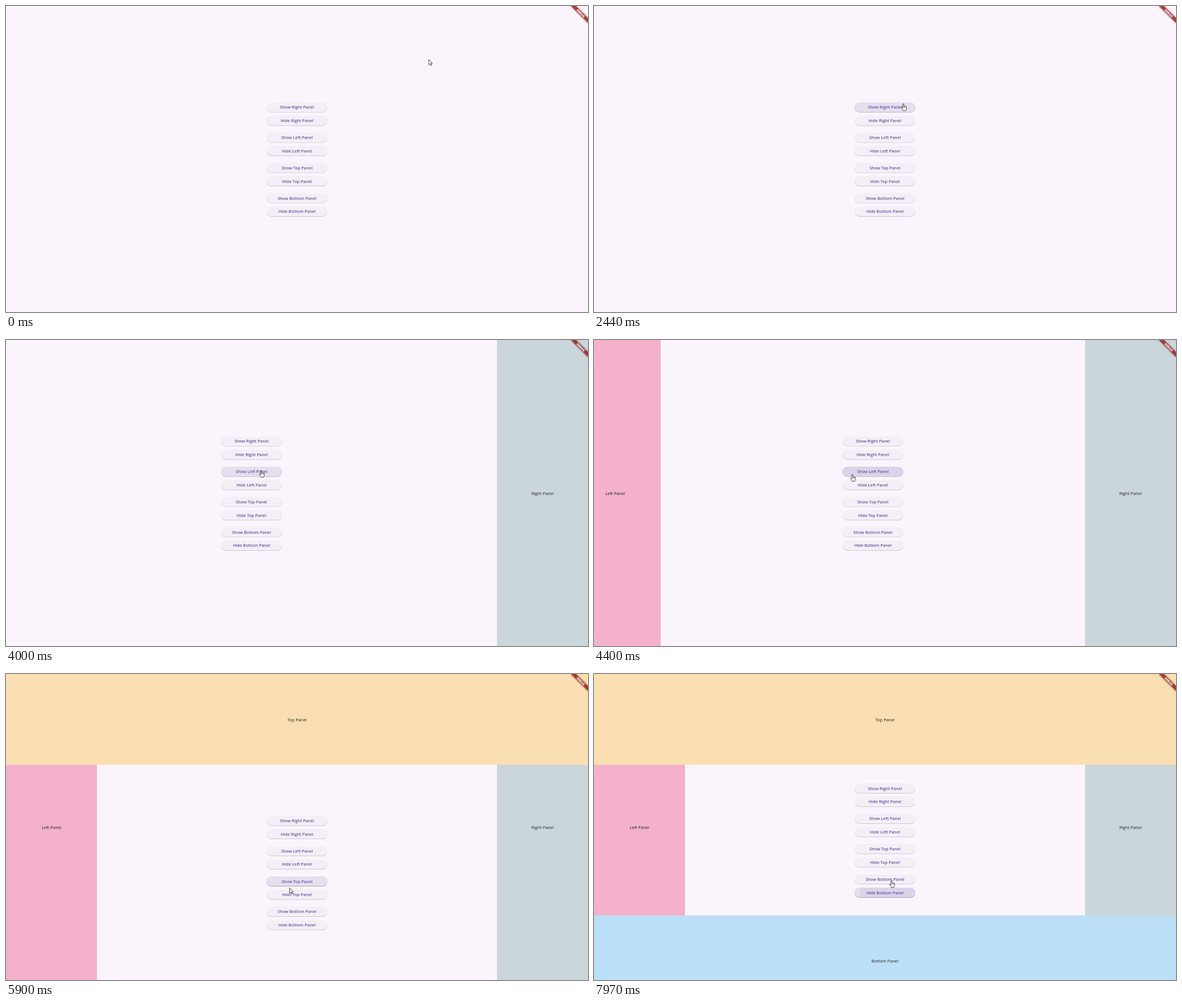
An HTML page for the animation above (8 s loop, 1031 by 543 pixels).

```html
<!DOCTYPE html>
<html lang="en">
<head>
<meta charset="utf-8">
<title>Sliding panels</title>
<style>
  html, body { margin: 0; width: 100%; height: 100%; overflow: hidden; background: #fbf4fc; }
  svg { display: block; width: 100vw; height: 100vh; }
  text { font-family: "Open Sans", "Noto Sans", sans-serif; font-size: 7.3px; text-anchor: middle; }
  .button text { font-weight: 600; fill: #6750a4; }
  .panel text { letter-spacing: .1px; fill: #1d1b20; }
  .banner { font-size: 5.4px; font-weight: 800; fill: #fff; }
  .cursor path { fill: #fff; stroke: #222; stroke-width: .8; stroke-linejoin: round; }
</style>
</head>
<body>
<svg viewBox="0 0 1031 543">
  <defs>
    <filter id="soft" x="-10%" y="-50%" width="120%" height="200%"><feGaussianBlur stdDeviation=".6"/></filter>
    <filter id="glow" x="-20%" y="-100%" width="140%" height="300%"><feGaussianBlur stdDeviation="1.5"/></filter>
    <clipPath id="pill"><rect x="-53.7" y="-8.6" width="107.4" height="17.2" rx="8.6"/></clipPath>
  </defs>
  <rect width="1031" height="543" fill="#fbf4fc"/>
  <g id="column"></g>
  <g id="panels"></g>
  <g transform="translate(1031 0) rotate(45)">
    <rect x="-21.5" y="15" width="43" height="6.45" opacity=".5" filter="url(#glow)"/>
    <rect x="-21.5" y="15" width="43" height="6.45" fill="#b71c1c" opacity=".63"/>
    <text class="banner" y="20.2">DEBUG</text>
  </g>
  <g id="arrow" class="cursor"><path d="M0 0V9.3L2.1 7.4L3.6 10.8L5 10.2L3.5 6.9H6.4Z"/></g>
  <g id="hand" class="cursor">
    <path d="M-.9 .8Q0-.5 .9 .8V4.6Q1.9 3.9 2.6 4.9Q3.6 4.3 4.2 5.3Q5.4 5 5.5 6.3V8.8Q5.4 10.4 4.4 11.4V12.7H-.5V11.6L-3.2 8Q-3.5 6.6-2.2 6.8L-.9 8Z"/>
    <path d="M1 5.5V7.3M2.7 5.6V7.3M4.2 6V7.4"/>
  </g>
</svg>
<script>
const W = 1031, H = 543, SIZE = 161.1, LOOP = 8000, SLIDE = 500;
const HALF_W = 53.7, HALF_H = 8.6, ROW = 23.65, PAIR = 53.75;
const $ = id => document.getElementById(id);

function add(parent, tag, attrs, text) {
  const node = document.createElementNS("http://www.w3.org/2000/svg", tag);
  for (const key in attrs) node.setAttribute(key, attrs[key]);
  if (text) node.textContent = text;
  return parent.appendChild(node);
}

const clamp = v => Math.min(1, Math.max(0, v));
const lerp = (a, b, k) => a + (b - a) * clamp(k);
const move = (node, x, y) => node.setAttribute("transform", `translate(${x} ${y})`);

// cubic-bezier(.42, 0, .58, 1)
function easeInOut(x) {
  x = clamp(x);
  let lo = 0, hi = 1;
  for (let i = 0; i < 20; i++) {
    const s = (lo + hi) / 2, u = 1 - s;
    if (3 * u * u * s * .42 + 3 * u * s * s * .58 + s ** 3 < x) lo = s; else hi = s;
  }
  return lo * lo * (3 - 2 * lo);
}

function makePanel(name, color, w, h) {
  const g = add($("panels"), "g", { class: "panel" });
  add(g, "rect", { width: w, height: h, fill: color });
  add(g, "text", { x: w / 2, y: h / 2 + 3.2 }, name + " Panel");
  return g;
}

const panels = {
  left: makePanel("Left", "#f3b1cc", SIZE, H),
  right: makePanel("Right", "#cbd6da", SIZE, H),
  top: makePanel("Top", "#fadfb2", W, SIZE),
  bottom: makePanel("Bottom", "#bbdff7", W, SIZE)
};

const pill = { x: -HALF_W, y: -HALF_H, width: 2 * HALF_W, height: 2 * HALF_H, rx: HALF_H };
const buttons = ["Right", "Left", "Top", "Bottom"].flatMap((side, pair) =>
  ["Show", "Hide"].map((verb, i) => {
    const y = (pair - 1.5) * PAIR + (i - .5) * ROW + .5;
    const g = add($("column"), "g", { class: "button" });
    move(g, 0, y);
    const shadow = add(g, "rect", { ...pill, y: .7 - HALF_H, fill: "#2b2440", filter: "url(#soft)" });
    add(g, "rect", { ...pill, fill: "#f4eff6" });
    const tint = add(g, "rect", { ...pill, fill: "#6750a4" });
    const clip = add(g, "g", { "clip-path": "url(#pill)" });
    const ripple = add(clip, "circle", { fill: "#6750a4" });
    add(g, "text", { y: 2.9 }, `${verb} ${side} Panel`);
    return { y, shadow, tint, ripple };
  }));

// Each click: the pointer arrives at (x, y), presses, and the panel starts to slide.
const clicks = [
  { button: 0, side: "right", arrive: 2100, press: 2900, x: 548, y: 173 },
  { button: 2, side: "left", arrive: 3600, press: 3990, x: 452, y: 231 },
  { button: 4, side: "top", arrive: 4750, press: 4865, x: 497, y: 286 },
  { button: 6, side: "bottom", arrive: 6200, press: 6285, x: 505, y: 421 },
  { button: 7, side: "bottom", arrive: 7500, press: 7695, x: 527, y: 366 }
];
const home = { x: 749, y: 95, press: 240 };
const RELEASE = 90, STAY = 360, LINGER = 1050;

// Visible width or height of a panel; a "Hide" button has an odd index.
const extent = (side, t) => clicks.filter(c => c.side === side).reduce((sum, c) =>
  sum + (c.button % 2 ? -SIZE : SIZE) * easeInOut((t - c.press - RELEASE) / SLIDE), 0);

const columnX = t => (W + extent("left", t) - extent("right", t)) / 2;
const columnY = t => (H + extent("top", t) - extent("bottom", t)) / 2;

function pointerAt(t) {
  let { x, y } = home, leave = home.press + STAY;
  for (const c of clicks) {
    const k = (t - leave) / (c.arrive - leave);
    x = lerp(x, c.x, k);
    y = lerp(y, c.y, k);
    leave = c.press + STAY;
  }
  return [x, y];
}

function draw(t) {
  move(panels.left, extent("left", t) - SIZE, 0);
  move(panels.right, W - extent("right", t), 0);
  move(panels.top, 0, extent("top", t) - SIZE);
  move(panels.bottom, 0, H - extent("bottom", t));

  const cx = columnX(t), cy = columnY(t);
  move($("column"), cx, cy);

  for (const { shadow, tint } of buttons) {
    shadow.setAttribute("opacity", .28);
    tint.setAttribute("opacity", 0);
  }
  for (const c of clicks) {
    const { shadow, tint, ripple } = buttons[c.button], age = t - c.press;
    const hover = Math.min(clamp((t - c.arrive + 50) / 150), clamp((LINGER - age) / 50 + 1));
    shadow.setAttribute("opacity", .28 + .2 * hover);
    tint.setAttribute("opacity", .1 * hover);
    ripple.setAttribute("cx", (c.x - columnX(c.press)) / 2);
    ripple.setAttribute("r", Math.max(0, age * .183));
    ripple.setAttribute("opacity", .08 * clamp((650 - age) / 250));
  }

  const [x, y] = pointerAt(t);
  const overButton = Math.abs(x - cx) < HALF_W && buttons.some(b => Math.abs(y - cy - b.y) < HALF_H);
  move($("arrow"), x, y);
  move($("hand"), x, y);
  $("arrow").style.display = overButton ? "none" : "";
  $("hand").style.display = overButton ? "" : "none";
}

const began = performance.now();
function tick() {
  draw((performance.now() - began) % LOOP);
  requestAnimationFrame(tick);
}
tick();
</script>
</body>
</html>
```
